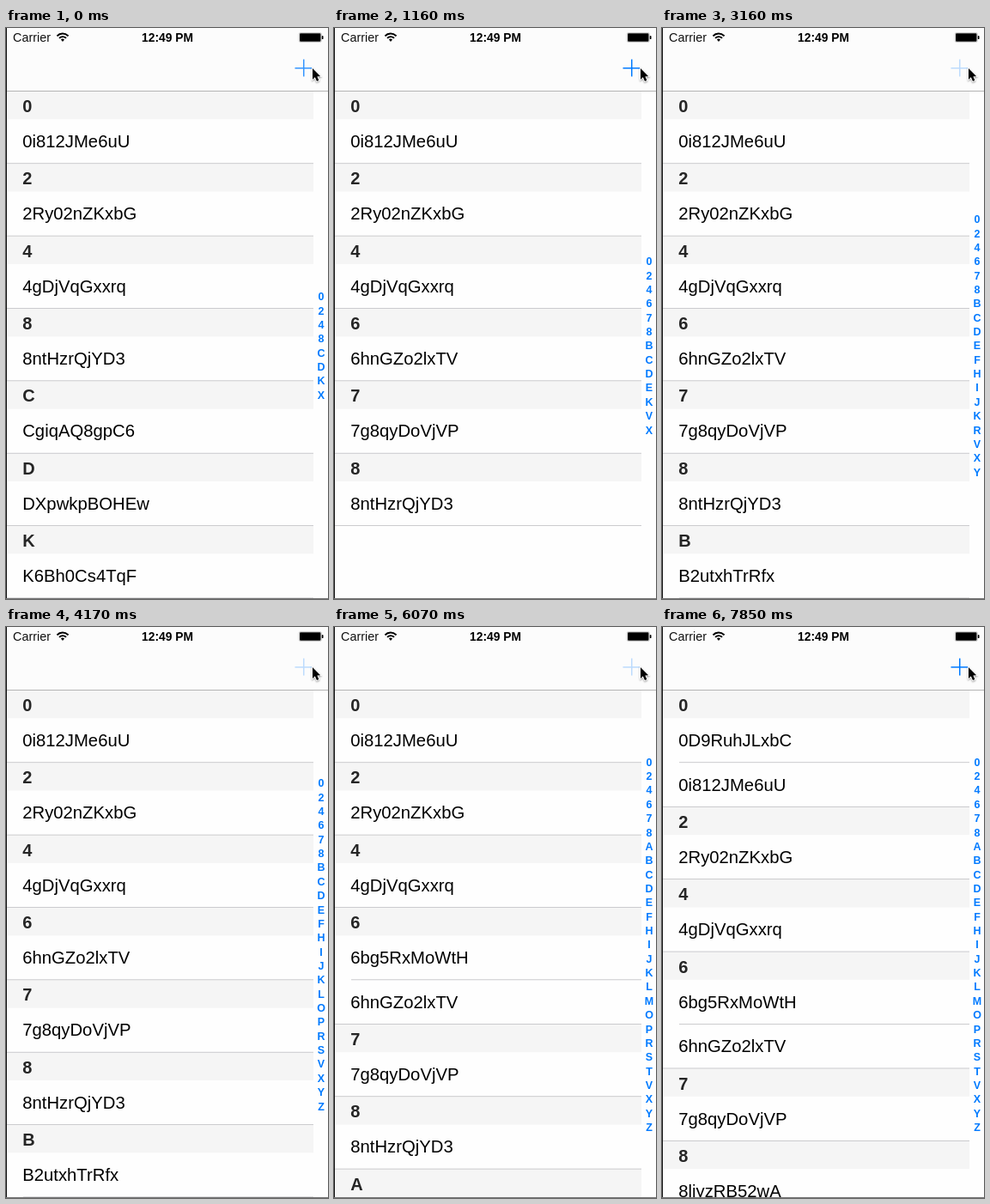
Write an HTML page with a canvas that moves like this. It is 375x665 px and loops after 8 s.

```html
<!DOCTYPE html>
<html>
<head>
<meta charset="utf-8">
<style>
html, body { margin: 0; height: 100%; overflow: hidden; background: #fff; }
canvas { display: block; }
</style>
</head>
<body>
<canvas id="stage" width="375" height="665"></canvas>
<script>
const ctx = document.getElementById('stage').getContext('2d');
const LOOP = 8000, LAG = 140, GROW = 300;
const TOP = 73.4, HEADER = 32.8, ROW = 51.56, RIGHT = 358, BOTTOM = 663;
const SANS = '"Liberation Sans", Arial, sans-serif';
const BLUE = '#007aff';

const initial = ['0i812JMe6uU', '2Ry02nZKxbG', '4gDjVqGxxrq', '8ntHzrQjYD3',
  'CgiqAQ8gpC6', 'DXpwkpBOHEw', 'K6Bh0Cs4TqF', 'X'];

// [button release time, inserted name]
const clicks = [
  [-100, '6hnGZo2lxTV'], [200, 'V'], [347, '7g8qyDoVjVP'], [700, 'E'], [880, 'B2utxhTrRfx'],
  [1590, 'I'], [1750, 'R'], [1920, 'Y'], [2150, 'F'], [2350, 'Bq'], [2560, 'H'],
  [2970, 'J'], [3220, 'L'], [3460, 'O'], [3680, 'P'], [3850, 'S'], [4010, 'Z'], [4250, 'Kx'],
  [4520, '6bg5RxMoWtH'], [4760, 'Rm'], [5000, 'A'], [5530, 'T'], [5780, 'M'],
  [6070, '8ljyzRB52wA'], [6460, 'Xb'], [6900, 'Yd'], [7380, '0D9RuhJLxbC']
];

const clamp = x => Math.max(0, Math.min(1, x));
const ease = x => x * x * (3 - 2 * x);

function text(str, x, y, font, color, align = 'left') {
  ctx.font = `${font} ${SANS}`;
  ctx.fillStyle = color;
  ctx.textAlign = align;
  ctx.fillText(str, x, y);
}

function rect(x, y, w, h, color) {
  ctx.fillStyle = color;
  ctx.fillRect(x, y, w, h);
}

function sectionsAt(t) {
  const items = initial.map(name => ({ name, grow: 1 }));
  for (const [release, name] of clicks) {
    const age = t - release - LAG;
    if (age >= 0) items.push({ name, grow: ease(clamp(age / GROW)) });
  }
  items.sort((a, b) => (a.name < b.name ? -1 : 1));
  const sections = new Map();
  for (const item of items) {
    const key = item.name[0];
    if (!sections.has(key)) sections.set(key, []);
    sections.get(key).push(item);
  }
  return sections;
}

function drawHeader(key, y) {
  rect(1, y, RIGHT - 1, HEADER, '#f5f5f5');
  text(key, 19.2, y + 24.65, 'bold 20px', '#262626');
}

function drawRow(name, y, inset) {
  rect(1, y, RIGHT - 1, ROW, '#fefefe');
  text(name, 19.2, y + 32.8, '20.3px', '#000');
  rect(inset, y + ROW - 0.35, RIGHT - inset, 0.7, '#b6b6ba');
}

function drawTable(sections) {
  const parts = [];
  let y = TOP, finalY = TOP;
  // Parts that will end below the screen are dropped at once.
  const place = (height, grow, draw) => {
    const top = y;
    // Reverse order keeps each separator above the part below it.
    if (finalY < BOTTOM) parts.unshift({ grow, draw: () => draw(top) });
    y += height * grow;
    finalY += height;
  };
  for (const [key, rows] of sections) {
    place(HEADER, Math.max(...rows.map(r => r.grow)), top => drawHeader(key, top));
    rows.forEach((r, i) => {
      const inset = i < rows.length - 1 ? 20 : 1;
      place(ROW, r.grow, top => drawRow(r.name, top, inset));
    });
  }
  // New parts fade in underneath those that make room for them.
  for (const part of parts.filter(p => p.grow < 1)) {
    ctx.globalAlpha = clamp(2 * part.grow - 1);
    part.draw();
  }
  ctx.globalAlpha = 1;
  for (const part of parts.filter(p => p.grow === 1)) part.draw();
}

function drawIndex(keys) {
  keys.forEach((key, i) => {
    const y = 369.9 + (i - (keys.length - 1) / 2) * 16.36;
    text(key, 367, y + 4.5, 'bold 12.5px', BLUE, 'center');
  });
}

function plusAlpha(t) {
  let alpha = 1, previous = -1000;
  for (const [release] of clicks) {
    const press = Math.max(release - 170, previous + 60);
    if (t >= press) alpha += (0.25 - alpha) * clamp((t - press) / 20);
    if (t >= release) alpha = 0.25 + 0.75 * clamp((t - release) / 140);
    previous = release;
  }
  return alpha;
}

function drawStatusBar() {
  text('Carrier', 8, 15.5, '14.4px', '#111');
  text('12:49 PM', 188, 15.5, 'bold 13.8px', '#000', 'center');
  ctx.strokeStyle = '#000';
  ctx.lineWidth = 1.9;
  for (const r of [5.4, 9]) {
    ctx.beginPath();
    ctx.arc(66, 15.5, r, -Math.PI * 0.76, -Math.PI * 0.24);
    ctx.stroke();
  }
  ctx.fillStyle = '#000';
  ctx.beginPath();
  ctx.moveTo(66, 16);
  ctx.arc(66, 15.5, 2.8, -Math.PI * 0.76, -Math.PI * 0.24);
  ctx.fill();

  ctx.strokeStyle = '#bbb';
  ctx.lineWidth = 0.7;
  ctx.beginPath();
  ctx.roundRect(341, 5.5, 26.5, 11, 2);
  ctx.stroke();
  ctx.beginPath();
  ctx.roundRect(342, 6.3, 24.5, 9.4, 1);
  ctx.roundRect(367.8, 9, 1.7, 4, 1);
  ctx.fill();
}

function drawCursor() {
  ctx.save();
  ctx.translate(357, 47);
  ctx.scale(0.92, 0.92);
  ctx.beginPath();
  [[0, 0], [0, 14], [3.1, 11.2], [5.4, 16.4], [8, 15.3], [5.8, 10.2], [10, 10.1]]
    .forEach(([x, y]) => ctx.lineTo(x, y));
  ctx.closePath();
  ctx.shadowColor = 'rgba(0,0,0,.4)';
  ctx.shadowBlur = 2;
  ctx.shadowOffsetY = 1;
  ctx.strokeStyle = '#fff';
  ctx.lineWidth = 1.8;
  ctx.stroke();
  ctx.shadowColor = 'transparent';
  ctx.fillStyle = '#000';
  ctx.fill();
  ctx.restore();
}

function draw(t) {
  const sections = sectionsAt(t);
  rect(0, 0, 375, 665, '#fefefe');
  drawTable(sections);
  drawIndex([...sections.keys()]);
  rect(0, 0, 375, 73, '#fcfcfc');
  rect(0, 73, 375, 1, '#b4b4b4');
  drawStatusBar();
  ctx.globalAlpha = plusAlpha(t);
  ctx.fillStyle = BLUE;
  ctx.beginPath();
  ctx.rect(336.5, 46, 20.5, 1.5);
  ctx.rect(346, 36.5, 1.5, 20);
  ctx.fill();
  ctx.globalAlpha = 1;
  drawCursor();
  rect(0, 0, 1, 665, '#111');
  rect(0, 664, 375, 1, '#777');
}

const start = performance.now();
function tick() {
  draw((performance.now() - start) % LOOP);
  requestAnimationFrame(tick);
}
tick();
</script>
</body>
</html>
```
